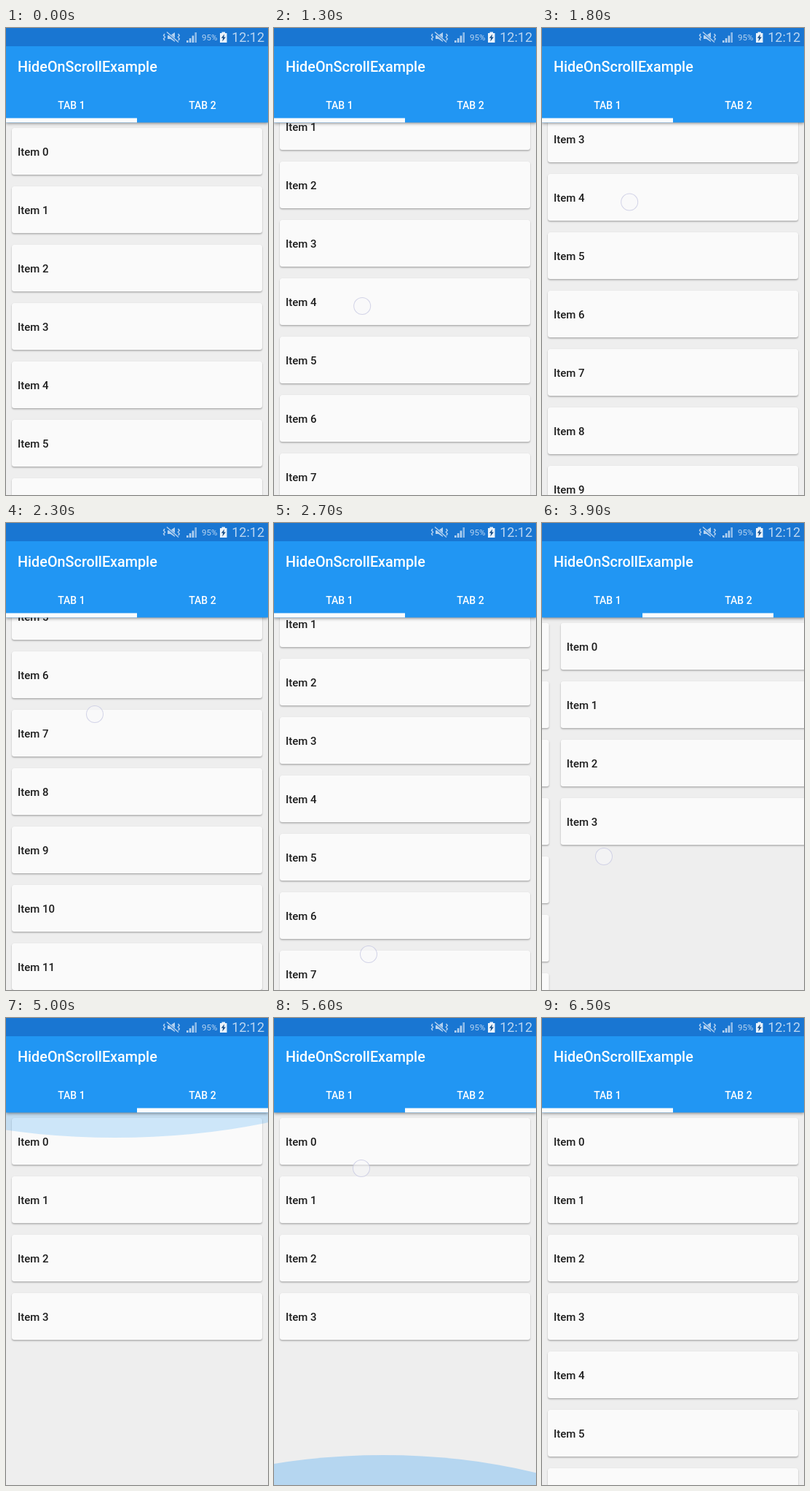
These frames come from a looping animation (360x640 px, 6.6 s). An HTML page:

```html
<!DOCTYPE html>
<html lang="en">
<head>
<meta charset="utf-8">
<title>Hide on scroll</title>
<style>
  html, body { margin: 0; width: 100%; height: 100%; overflow: hidden; background: #eee; }
  #stage { position: relative; width: 360px; height: 640px; overflow: hidden; background: #eee;
    font-family: Roboto, sans-serif; font-weight: 500; }
  #stage * { position: absolute; box-sizing: border-box; white-space: nowrap; }
  #body { left: 0; top: 129px; width: 360px; height: 511px; overflow: hidden; }
  .page { left: 0; top: 0; width: 360px; height: 511px; }
  .card { left: 8px; width: 344px; height: 64px; padding-left: 8px; border-radius: 3px;
    background: #fafafa; box-shadow: 0 1.5px 2px rgba(0,0,0,.27), 0 0 1px rgba(0,0,0,.1);
    font-size: 15px; line-height: 67px; color: #1d1d1d; }
  #glow { left: 0; top: 0; }
  #header { left: 0; top: 25px; width: 360px; height: 104px; background: #2196f3; color: #fff;
    box-shadow: 0 .5px 0 #2196f3, 0 1.5px 4px rgba(0,0,0,.42); }
  #title { left: 16px; top: 17px; font-size: 19.8px; line-height: 24px; }
  .tab { top: 71px; width: 180px; text-align: center; font-size: 14px; line-height: 20px; }
  #line { left: 0; top: 98px; width: 180px; height: 6px; background: #fbfcfd; }
  #status { left: 0; top: 0; width: 360px; height: 25px; background: #1976d2; color: #b9d5f1; font-weight: 400; }
  #status svg { left: 0; top: 0; }
  #level { left: 269px; top: 6px; font-size: 11.5px; line-height: 15px; }
  #clock { right: 5px; top: 3px; font-size: 18px; line-height: 20px; }
  #touch { left: -12px; top: -12px; width: 24px; height: 24px; border-radius: 50%;
    border: 1.3px solid rgba(186,188,220,.62); background: rgba(248,248,250,.55); }
</style>
</head>
<body>
<div id="stage">
  <div id="body">
    <div class="page" id="page1"></div>
    <div class="page" id="page2"></div>
    <svg id="glow" width="360" height="511"><circle id="arc" cy="-468" r="540" fill="#2196f3"/></svg>
  </div>
  <div id="header">
    <div id="title">HideOnScrollExample</div>
    <div class="tab" style="left:0">TAB 1</div>
    <div class="tab" style="left:180px">TAB 2</div>
    <div id="line"></div>
  </div>
  <div id="status">
    <svg width="360" height="25" fill="#b5d2f0">
      <path d="M222 10h4l6-4v13l-6-4h-4z"/>
      <path d="M220 5L237 20" stroke="#1976d2" stroke-width="3"/>
      <path d="M221 5.5L237 19.5M218 8l-1.5 2.3 2 2.2-2 2.2 1.5 2.3M236.5 8l1.8 2.3-2 2.2 2 2.2-1.5 2.3"
        fill="none" stroke="#b5d2f0" stroke-width="1.4"/>
      <path d="M248 17h2.6v3H248zM251.8 14h2.6v6h-2.6zM255.6 10.5h2.6V20h-2.6z"/>
      <path d="M259.4 6h2.6v14h-2.6z" opacity=".75"/>
      <path d="M296.5 5.5h4.5V7h2.5v13H294V7h2.5z" fill="#eaf3fc"/>
      <path d="M300 8.5l-4.2 5.3h2.4l-1 4.7 4.7-6h-2.6z" fill="#174f8a"/>
    </svg>
    <div id="level">95%</div>
    <div id="clock">12:12</div>
  </div>
  <div id="touch"></div>
</div>
<script>
  const LOOP = 6600, STEP = 100, LINE_LAG = 60;
  const $ = id => document.getElementById(id);

  const ramp = (t, from, to) => Math.min(1, Math.max(0, (t - from) / (to - from)));
  const lerp = (a, b, u) => a + (b - a) * u;
  const easeOut = u => 1 - (1 - u) ** 2;
  const smooth = u => u * u * (3 - 2 * u);

  // Slow drag up, fling on, then a quick drag back to the top.
  const scroll = t => 285.5 * ramp(t, 900, 1900)
    + 155.5 * easeOut(ramp(t, 1900, 2300))
    - 441 * ramp(t, 2300, 2835);

  const swipe = t => smooth(ramp(t, 3610, 3945)) - smooth(ramp(t, 6050, 6430));

  const drags = [
    { from: 900, to: 1900, start: [122, 495], end: [120, 210] },
    { from: 2300, to: 2700, start: [122, 262], end: [130, 591] },
    { from: 3700, to: 3900, start: [285, 478], end: [85, 457] },
    { from: 4400, to: 4800, start: [118, 200], end: [120, 470] },
    { from: 5200, to: 5600, start: [122, 470], end: [120, 206] },
    { from: 6100, to: 6300, start: [90, 425], end: [280, 430] }
  ];

  // Edge glows grow evenly to a peak, then recede.
  const glows = [
    { from: 2800, peak: 3000, end: 3700, size: .92, x: 180 },
    { from: 4450, peak: 4850, end: 5350, size: .99, x: 150 },
    { from: 5250, peak: 5600, end: 6050, size: .57, x: 150, bottom: true }
  ];

  const glowSize = (g, t) =>
    g.size * (ramp(t, g.from, g.peak) - easeOut(ramp(t, g.peak, g.end)));

  function fill(page, count) {
    for (let i = 0; i < count; i++) {
      const card = document.createElement('div');
      card.className = 'card';
      card.style.top = 8 + 80 * i + 'px';
      card.textContent = 'Item ' + i;
      page.append(card);
    }
  }

  function move(el, x, y = 0) {
    el.style.transform = `translate(${x}px, ${y}px)`;
  }

  function drawTouch(t) {
    const d = drags.find(d => t >= d.from && t <= d.to);
    $('touch').style.display = d ? '' : 'none';
    if (!d) return;
    const u = ramp(t, d.from, d.to);
    move($('touch'), ...d.start.map((v, i) => lerp(v, d.end[i], u)));
  }

  function drawGlow(t) {
    const g = glows.find(g => t > g.from && t < g.end);
    $('glow').style.display = g ? '' : 'none';
    if (!g) return;
    const s = glowSize(g, t);
    $('arc').setAttribute('transform',
      `translate(${g.x} ${g.bottom ? 511 : 0}) scale(1 ${g.bottom ? -s : s})`);
    $('arc').setAttribute('fill-opacity', Math.min(.35, .86 * s * s));
  }

  function draw(t) {
    const p = swipe(t);
    move($('page1'), -360 * p, -Math.round(scroll(t)));
    move($('page2'), 360 * (1 - p));
    move($('line'), 180 * swipe(t - LINE_LAG), .5);
    drawTouch(t);
    drawGlow(t);
  }

  fill($('page1'), 20);
  fill($('page2'), 4);

  const start = performance.now();
  function tick() {
    const t = (performance.now() - start) % LOOP;
    draw(Math.floor(t / STEP) * STEP);
    requestAnimationFrame(tick);
  }
  tick();
</script>
</body>
</html>
```
